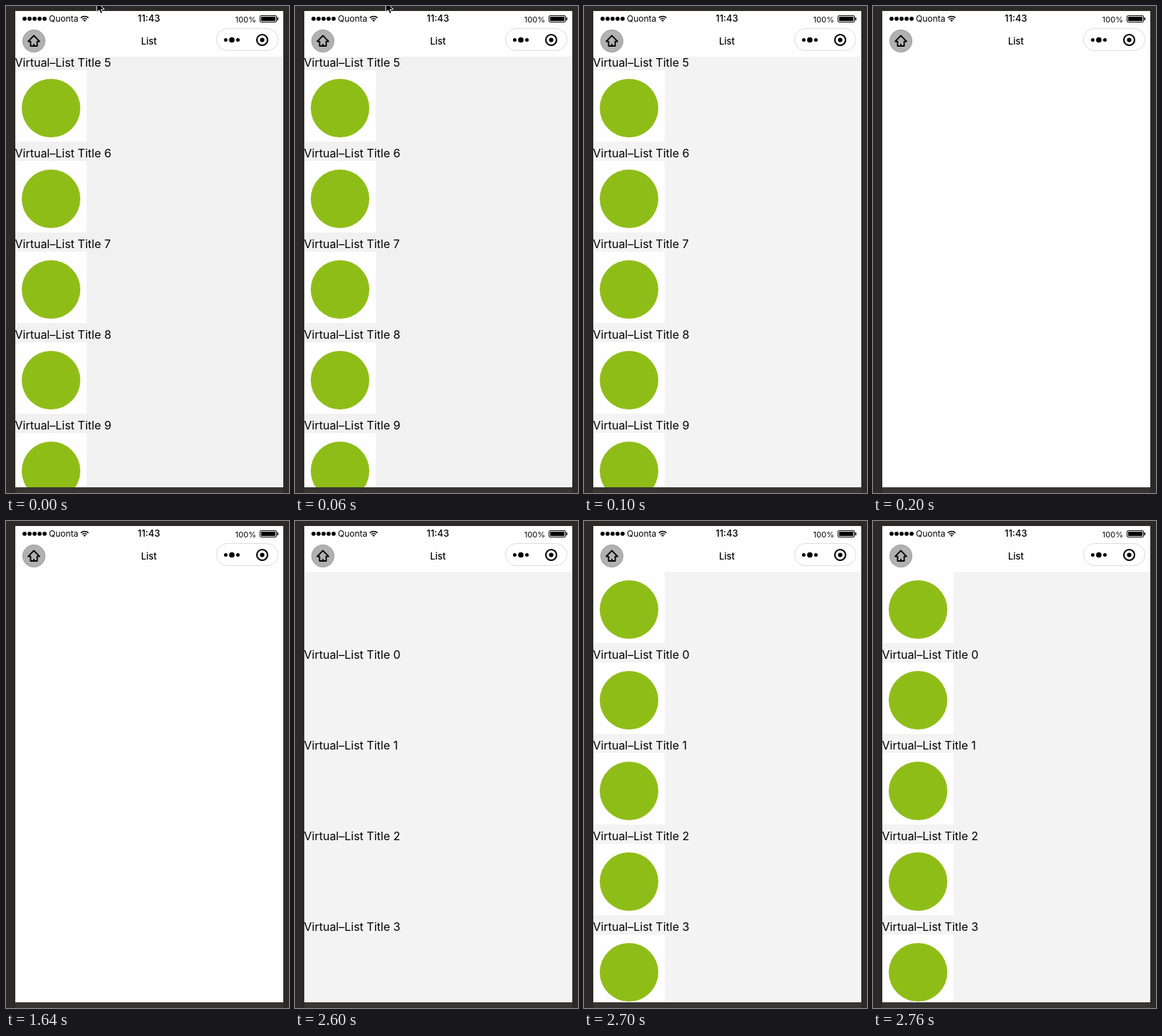
Animation of 396x682 px, one loop 2.8 s. Source, as an HTML page with a canvas:

```html
<!DOCTYPE html>
<html lang="en">
<head>
<meta charset="utf-8">
<title>Virtual list</title>
<style>
html, body { margin: 0; width: 100%; height: 100%; overflow: hidden; background: #2b2a29; }
canvas { display: block; width: 396px; height: 682px; }
</style>
</head>
<body>
<canvas id="stage"></canvas>
<script>
const W = 396, H = 682, LOOP = 2800;
const SCREEN = { x: 13, y: 7, w: 375, h: 667 };
const NAV_BOTTOM = 71, ROW = 127, TILE = 100;

// Each state holds until the next one starts; firstTile is the top of the first picture.
const STATES = [
  { from: 0, bg: '#f1f1f1', title: 5, baseline: 85, firstTile: 90, pointer: true },
  { from: 100, bg: '#f3f3f3', title: 5, baseline: 85, firstTile: 90 },
  { from: 200, bg: '#ffffff' },
  { from: 2600, bg: '#f3f3f3', title: 0, baseline: 193 },
  { from: 2700, bg: '#f3f3f3', title: 0, baseline: 193, firstTile: 71 }
];

const canvas = document.getElementById('stage');
const ctx = canvas.getContext('2d');
const ratio = window.devicePixelRatio || 1;
canvas.width = W * ratio;
canvas.height = H * ratio;
ctx.scale(ratio, ratio);

function rect(x, y, w, h, color) {
  ctx.fillStyle = color;
  ctx.fillRect(x, y, w, h);
}

function disc(x, y, r, color) {
  ctx.beginPath();
  ctx.arc(x, y, r, 0, Math.PI * 2);
  ctx.fillStyle = color;
  ctx.fill();
}

function ring(x, y, r, width, color) {
  ctx.beginPath();
  ctx.arc(x, y, r, 0, Math.PI * 2);
  ctx.lineWidth = width;
  ctx.strokeStyle = color;
  ctx.stroke();
}

function roundBox(x, y, w, h, r) {
  ctx.beginPath();
  ctx.roundRect(x, y, w, h, r);
}

function polygon(points) {
  ctx.beginPath();
  points.forEach(([x, y]) => ctx.lineTo(x, y));
  ctx.closePath();
}

function text(value, x, y, size, align = 'left', weight = 400) {
  ctx.font = `${weight} ${size}px Inter, "Liberation Sans", sans-serif`;
  ctx.textAlign = align;
  ctx.fillStyle = '#000';
  ctx.fillText(value, x, y);
}

function drawBackdrop() {
  rect(0, 0, W, H, '#2b2a29');
  rect(SCREEN.x, 674, SCREEN.w, 8, '#363534');
}

function drawWifi() {
  const cx = 110, cy = 22;
  ctx.strokeStyle = '#000';
  ctx.lineWidth = 1.5;
  for (const r of [4.6, 7.6]) {
    ctx.beginPath();
    ctx.arc(cx, cy, r, -Math.PI * 0.75, -Math.PI * 0.25);
    ctx.stroke();
  }
  ctx.beginPath();
  ctx.moveTo(cx, cy);
  ctx.arc(cx, cy, 2.6, -Math.PI * 0.75, -Math.PI * 0.25);
  ctx.fillStyle = '#000';
  ctx.fill();
}

function drawBattery() {
  ctx.strokeStyle = '#000';
  ctx.lineWidth = 1;
  roundBox(355.5, 13.5, 23, 9, 1.5);
  ctx.stroke();
  rect(357, 15, 20, 6, '#000');
  rect(379.5, 16, 1.5, 4, '#000');
}

function drawStatusBar() {
  for (let i = 0; i < 5; i++) disc(26 + i * 7, 17.8, 2.9, '#000');
  text('Quonta', 60, 22, 12);
  drawWifi();
  text('11:43', 200, 22, 13, 'center', 500);
  text('100%', 350, 23, 11, 'right');
  drawBattery();
}

function drawHomeButton() {
  disc(39, 49, 16, '#b1b1b1');
  ring(39, 49, 15.5, 1, '#a3a3a3');
  polygon([[39, 41.5], [47, 49.6], [43.6, 49.6], [43.6, 56],
           [34.4, 56], [34.4, 49.6], [31, 49.6]]);
  ctx.strokeStyle = '#000';
  ctx.lineWidth = 1.8;
  ctx.lineJoin = 'round';
  ctx.stroke();
  rect(38.1, 53, 1.8, 3, '#000');
}

function drawCapsule() {
  roundBox(294.5, 31.5, 86, 31, 15.5);
  ctx.fillStyle = '#fff';
  ctx.fill();
  ctx.strokeStyle = '#dcdcdc';
  ctx.lineWidth = 1;
  ctx.stroke();
  disc(307.5, 47.5, 2.5, '#000');
  disc(316, 47.5, 3.8, '#000');
  disc(324.5, 47.5, 2.5, '#000');
  ring(358.5, 47.5, 7.5, 2.1, '#000');
  disc(358.5, 47.5, 3.1, '#000');
}

function drawList(state) {
  if (state.firstTile !== undefined) {
    for (let y = state.firstTile; y < H; y += ROW) {
      rect(SCREEN.x, y, TILE, TILE, '#fefefe');
      disc(SCREEN.x + 50, y + 53, 41, '#8fbd18');
    }
  }
  if (state.title !== undefined) {
    for (let y = state.baseline, n = state.title; y < H; y += ROW, n++) {
      text('Virtual–List Title ' + n, SCREEN.x - 0.5, y, 16);
    }
  }
}

function drawPointer() {
  polygon([[127, -6], [137.5, 4.5], [132.8, 5], [135.2, 9.5],
           [132.6, 10.6], [130.4, 5.8], [127, 8.6]]);
  ctx.fillStyle = '#000';
  ctx.fill();
  ctx.strokeStyle = '#fff';
  ctx.lineWidth = 1;
  ctx.stroke();
}

function draw(time) {
  const t = time % LOOP;
  const state = STATES.findLast(s => s.from <= t);
  drawBackdrop();
  ctx.save();
  ctx.beginPath();
  ctx.rect(SCREEN.x, SCREEN.y, SCREEN.w, SCREEN.h);
  ctx.clip();
  rect(SCREEN.x, SCREEN.y, SCREEN.w, SCREEN.h, state.bg);
  drawList(state);
  rect(SCREEN.x, SCREEN.y, SCREEN.w, NAV_BOTTOM - SCREEN.y, '#fefefe');
  drawStatusBar();
  drawHomeButton();
  text('List', 200, 54, 13, 'center', 500);
  drawCapsule();
  ctx.restore();
  if (state.pointer) drawPointer();
}

const start = performance.now();
function tick() {
  draw(performance.now() - start);
  requestAnimationFrame(tick);
}
tick();
</script>
</body>
</html>
```
